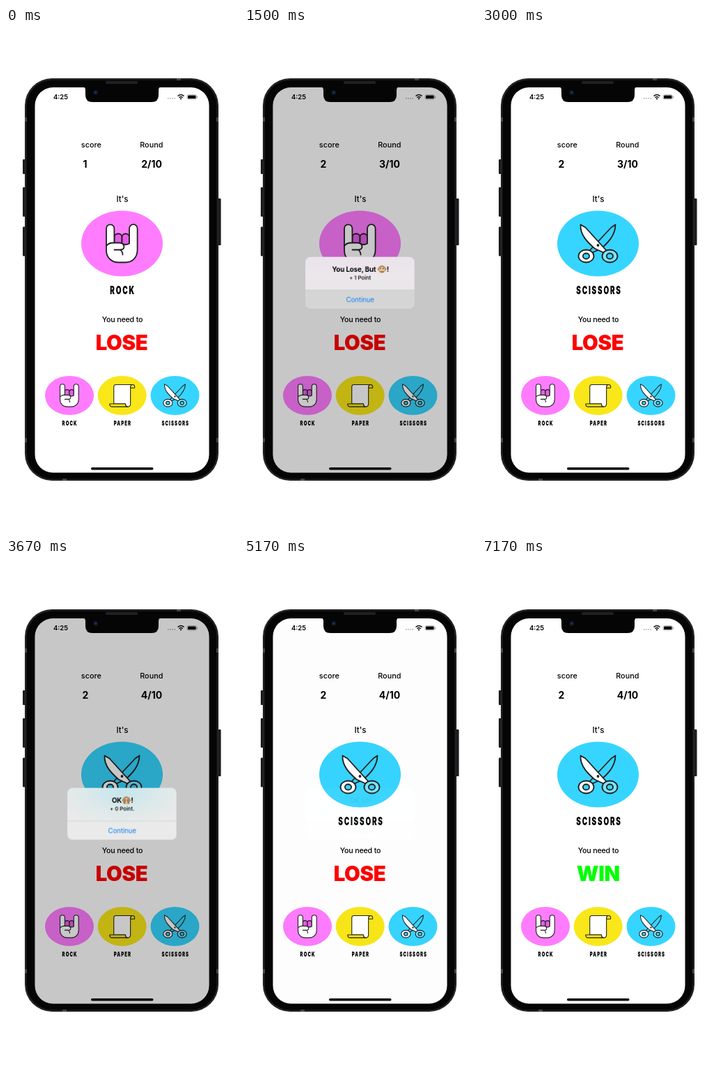
Write an HTML page that moves like this. It is 333 by 720 pixels and loops after 8000 ms.

```html
<!DOCTYPE html>
<html lang="en">
<head>
<meta charset="utf-8">
<title>Rock paper scissors</title>
<style>
html, body { margin: 0; width: 100%; height: 100%; overflow: hidden; background: #fff; }
svg { display: block; }
text { font-family: Inter, Roboto, sans-serif; text-anchor: middle; }
.small { font-size: 10.8px; font-weight: 500; }
.value { font-size: 14px; font-weight: 700; }
.goal { font-size: 29.3px; font-weight: 900; letter-spacing: -.3px; }
.label { font-weight: 900; letter-spacing: .18em; }
.title { font-size: 9.7px; font-weight: 700; letter-spacing: -.1px; }
.note { font-size: 7.7px; font-weight: 500; }
.action { font-size: 9.7px; fill: #1380f0; letter-spacing: -.1px; }
.line { stroke: #202020; stroke-width: 1.8; stroke-linejoin: round; stroke-linecap: round; }

/* Everything changes on a sixth-of-a-second beat, without tweening */
.t { animation: 8s step-end infinite; }
.one { animation-name: one; }
.two { animation-name: two; }
.r3 { animation-name: r3; }
.r4 { animation-name: r4; }
.rock { animation-name: rock; }
.scissors { animation-name: scissors; }
.lose { animation-name: lose; }
.win { animation-name: win; }
.tap { animation-name: tap; }
.alert1 { animation-name: alert1; }
.alert2 { animation-name: alert2; }
.grow1 { animation-name: grow1; transform-origin: 166.5px 364.5px; }
.grow2 { animation-name: grow2; transform-origin: 166.5px 364.5px; }
.press1 { animation-name: press1; }
.press2 { animation-name: press2; }
@keyframes one { 0% { opacity: 1 } 4.2%, 100% { opacity: 0 } }
@keyframes two { 0% { opacity: 0 } 4.2%, 100% { opacity: 1 } }
@keyframes r3 { 0% { opacity: 0 } 4.2% { opacity: 1 } 43.7%, 100% { opacity: 0 } }
@keyframes r4 { 0% { opacity: 0 } 43.7%, 100% { opacity: 1 } }
@keyframes rock { 0% { opacity: 1 } 31.2%, 100% { opacity: 0 } }
@keyframes scissors { 0% { opacity: 0 } 31.2%, 100% { opacity: 1 } }
@keyframes lose { 0% { opacity: 1 } 74.9%, 100% { opacity: 0 } }
@keyframes win { 0% { opacity: 0 } 74.9%, 100% { opacity: 1 } }
@keyframes tap {
  0% { opacity: 1 } 2.1% { opacity: .5 } 4.2% { opacity: 1 }
  41.7% { opacity: .5 } 43.7%, 100% { opacity: 1 }
}
@keyframes alert1 {
  0% { opacity: 0 } 4.2% { opacity: .55 } 6.2% { opacity: 1 }
  20.8% { opacity: .4 } 22.9% { opacity: .01 } 24.9%, 100% { opacity: 0 }
}
@keyframes alert2 {
  0% { opacity: 0 } 43.7% { opacity: .55 } 45.8% { opacity: 1 }
  62.4% { opacity: .4 } 64.5% { opacity: .04 } 66.6%, 100% { opacity: 0 }
}
@keyframes grow1 { 0% { transform: scale(1.06) } 6.2%, 100% { transform: none } }
@keyframes grow2 { 0% { transform: scale(1.06) } 45.8%, 100% { transform: none } }
@keyframes press1 { 0% { opacity: 0 } 16.7%, 100% { opacity: 1 } }
@keyframes press2 { 0% { opacity: 0 } 60.4%, 100% { opacity: 1 } }
</style>
</head>
<body>
<svg width="333" height="720" viewBox="0 0 333 720">
  <defs>
    <clipPath id="screen"><rect x="41.5" y="85" width="250" height="551.5" rx="26"/></clipPath>
    <clipPath id="sheet"><rect x="88" y="327.5" width="157" height="74.5" rx="8"/></clipPath>
    <linearGradient id="pinkGlass" x2="0" y2="1">
      <stop offset="0" stop-color="#ebe3eb"/>
      <stop offset=".4" stop-color="#ebe8eb"/>
      <stop offset="1" stop-color="#e6e6e6"/>
    </linearGradient>
    <radialGradient id="blueGlass" cx=".5" cy=".1" r=".6">
      <stop offset="0" stop-color="#c6e6ee"/>
      <stop offset=".55" stop-color="#dde9ea"/>
      <stop offset="1" stop-color="#e9eae9"/>
    </radialGradient>

    <g id="rock">
      <ellipse rx="58.5" ry="47" fill="#ff7cff"/>
      <g class="line" fill="#fff">
        <g fill="#e65ee9">
          <rect x="-11" y="-14" width="11" height="22" rx="5"/>
          <rect x="0" y="-14" width="10.5" height="22" rx="5"/>
        </g>
        <path d="M-22.5-21.5a5.7 5.7 0 0 1 11.4 0V0Q-5 3 0 0Q5 3 10.5 0V-21.5a5.8 5.8 0 0 1 11.6 0V9C22 20 15 27 5 27H-5C-15 27-22.5 20-22.5 10Z"/>
        <path d="M-22 3Q-19-1-13-1H-3Q3 0 3 4.5Q3 9-3 9H-11M-3 9Q1 11 1 16"/>
      </g>
    </g>

    <g id="paper">
      <ellipse rx="58.5" ry="47" fill="#f9e719"/>
      <g class="line" fill="#fff">
        <path d="M-20-20Q-20-26-15-26H26Q20-26 20-19V20Q20 27 13 27Q8 27 8 20H-20Z"/>
        <g fill="#f9e719">
          <path d="M20-18H30Q31-26 25-26Q20-26 20-18Z"/>
          <path d="M8 20H-30Q-30 27-24 27H13Q8 27 8 20Z"/>
        </g>
      </g>
    </g>

    <g id="scissors">
      <ellipse rx="58.5" ry="47" fill="#36d5ff"/>
      <g class="line">
        <path d="M25-27L19-23L-12 10L-8 13L5 7C14-1 25-12 25-27Z" fill="#36d5ff"/>
        <path d="M-25-27L-18-23L12 10L8 13L-5 7C-14-1-26-12-25-27Z" fill="#fff"/>
        <ellipse cx="-17" cy="18" rx="11" ry="9" fill="#fff"/>
        <ellipse cx="-17" cy="18" rx="4.6" ry="4" fill="#36d5ff"/>
        <ellipse cx="17" cy="18" rx="11" ry="9" fill="#7be4ff"/>
        <ellipse cx="17" cy="18" rx="4.6" ry="4" fill="#36d5ff"/>
        <circle cy="2.5" r="1" fill="#202020"/>
      </g>
    </g>

    <g id="monkey">
      <circle cx="-5" r="1.7" fill="#d0a577"/>
      <circle cx="5" r="1.7" fill="#d0a577"/>
      <circle r="5.3" fill="#a0764d"/>
      <ellipse cy=".8" rx="4.3" ry="4.2" fill="#ecc795"/>
    </g>
  </defs>

  <!-- phone -->
  <g fill="#1d1d1f">
    <rect x="24" y="188" width="4" height="21" rx="1"/>
    <rect x="24" y="228" width="4" height="42" rx="1"/>
    <rect x="24" y="284.5" width="4" height="42" rx="1"/>
    <rect x="304" y="244" width="4.5" height="67" rx="1"/>
  </g>
  <rect x="27" y="72" width="278" height="576" rx="39" fill="#222224"/>
  <rect x="29.5" y="74.5" width="273" height="571" rx="37" fill="#050505"/>
  <g fill="#4a4a4d">
    <rect x="27" y="128" width="3" height="6"/>
    <rect x="302" y="128" width="3" height="6"/>
    <rect x="27" y="587" width="3" height="6"/>
    <rect x="302" y="587" width="3" height="6"/>
    <rect x="81" y="645" width="6" height="3"/>
    <rect x="245" y="72" width="6" height="3"/>
  </g>

  <g clip-path="url(#screen)">
    <rect x="41" y="84" width="252" height="553" fill="#fff"/>

    <!-- status bar -->
    <text x="78.5" y="102.3" font-size="9.5" font-weight="600">4:25</text>
    <path d="M232 100.8H243" stroke="#aaa" stroke-width="1.6" stroke-dasharray="1.6 1.5"/>
    <g fill="none" stroke="#111" stroke-width="1.5">
      <path d="M246.5 97.5Q251 93.5 255.5 97.5M248.4 99.7Q251 97.4 253.6 99.7"/>
      <rect x="260" y="95.7" width="13.5" height="6.3" rx="2" stroke="#999" stroke-width=".8"/>
    </g>
    <circle cx="251" cy="101.3" r="1.1"/>
    <rect x="261" y="96.6" width="11.5" height="4.5" rx="1.2"/>
    <path d="M274.7 97.7v2.3" stroke="#999"/>

    <!-- scores -->
    <text class="small" x="122.3" y="171">score</text>
    <text class="small" x="208.8" y="171">Round</text>
    <text class="value t one" x="113.5" y="200">1</text>
    <text class="value t two" x="114" y="200">2</text>
    <text class="value t one" x="209" y="200">2/10</text>
    <text class="value t r3" x="209" y="200">3/10</text>
    <text class="value t r4" x="209" y="200">4/10</text>

    <!-- current sign -->
    <text class="small" x="167" y="249" style="font-size:11.5px">It's</text>
    <g class="t rock">
      <use href="#rock" x="166.5" y="308.5"/>
      <text class="label" font-size="15.8" transform="translate(167.5 381) scale(.63 1)">ROCK</text>
    </g>
    <g class="t scissors">
      <use href="#scissors" x="166.5" y="308.5"/>
      <text class="label" font-size="15.8" transform="translate(168 381) scale(.63 1)">SCISSORS</text>
    </g>

    <!-- goal -->
    <text class="small" x="167" y="420.5" style="font-size:10.7px;letter-spacing:-.2px">You need to</text>
    <text class="goal t lose" x="166" y="460.6" fill="#f00">LOSE</text>
    <text class="goal t win" x="166.7" y="460.6" fill="#0f0">WIN</text>

    <!-- choices -->
    <g transform="translate(91 526)">
      <use href="#rock" transform="scale(.598)"/>
      <text class="label" font-size="9.6" transform="translate(.7 43.3) scale(.63 1)">ROCK</text>
    </g>
    <g transform="translate(166.7 526)">
      <use href="#paper" transform="scale(.598)"/>
      <text class="label" font-size="9.6" transform="translate(.8 43.3) scale(.63 1)">PAPER</text>
    </g>
    <g class="t tap" transform="translate(242.5 526)">
      <use href="#scissors" transform="scale(.598)"/>
      <text class="label" font-size="9.6" transform="translate(.8 43.3) scale(.63 1)">SCISSORS</text>
    </g>

    <!-- alerts -->
    <g class="t alert1">
      <rect x="41" y="84" width="252" height="553" opacity=".22"/>
      <g class="t grow1">
        <g clip-path="url(#sheet)">
          <rect x="88" y="327" width="157" height="76" fill="url(#pinkGlass)"/>
          <rect class="t press1" x="88" y="375" width="157" height="28" fill="#d5d5d6"/>
          <path d="M88 375H245" stroke="#cacacb" stroke-width=".7"/>
        </g>
        <text class="title" x="189.3" y="348.8" style="text-anchor:end">You Lose, But</text>
        <g transform="translate(198 345.3)">
          <use href="#monkey"/>
          <path d="M-1.8-1v.1M1.8-1v.1" stroke="#3b2719" stroke-width="1.5" stroke-linecap="round"/>
          <path d="M-2 3.5H2" stroke="#a57951" stroke-width="2.2" stroke-linecap="round"/>
        </g>
        <text class="title" x="206.3" y="348.8">!</text>
        <text class="note" x="166.7" y="360.7">+ 1 Point</text>
        <text class="action" x="166.7" y="392.3">Continue</text>
      </g>
    </g>
    <g class="t alert2">
      <rect x="41" y="84" width="252" height="553" opacity=".22"/>
      <g class="t grow2">
        <g clip-path="url(#sheet)">
          <rect x="88" y="327" width="157" height="76" fill="url(#blueGlass)"/>
          <rect class="t press2" x="88" y="375" width="157" height="28" fill="#d5d5d6"/>
          <path d="M88 375H245" stroke="#cfd3d4" stroke-width=".7"/>
        </g>
        <text class="title" x="166" y="348.8" style="text-anchor:end">OK</text>
        <g transform="translate(172.8 345.3)">
          <use href="#monkey"/>
          <path d="M-3 3.8L-2-.5M3 3.8L2-.5" stroke="#a57951" stroke-width="3" stroke-linecap="round"/>
        </g>
        <text class="title" x="181" y="348.8">!</text>
        <text class="note" x="166.7" y="360.7">+ 0 Point.</text>
        <text class="action" x="166.7" y="392.3">Continue</text>
      </g>
    </g>

    <rect x="122" y="629" width="89.5" height="3.5" rx="1.7"/>
  </g>

  <!-- notch -->
  <path d="M110 84Q114 84.5 114 89V96Q114 106 124 106H209Q219 106 219 96V89Q219 84.5 223 84Z" fill="#050505"/>
  <rect x="143" y="76" width="46" height="4" rx="1.5" fill="#202022"/>
  <circle cx="128.7" cy="92.3" r="3.6" fill="#0d1420"/>
  <circle cx="128.7" cy="92.3" r="1.7" fill="#17355f"/>
</svg>
</body>
</html>
```
